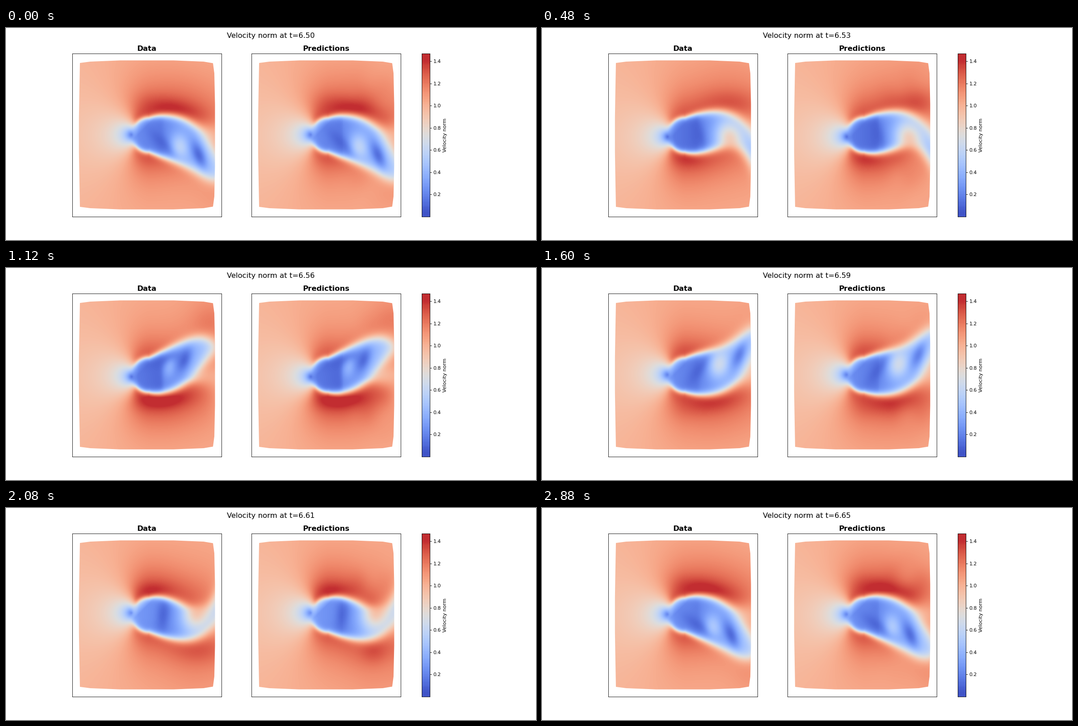
Recreate the animation shown at these times as a matplotlib script. Size 1183x473 px, loop 3040 ms.

```python
import numpy as np
import matplotlib.pyplot as plt
from matplotlib.animation import FuncAnimation
from matplotlib.colors import ListedColormap
from matplotlib.patches import Polygon

W, H, DPI = 1183, 473, 78.87
FRAMES, STEP = 19, 160
HALF = 9.3                 # half a shedding period, in frames
CX, CY, R = 318, 238.5, 38.5
VMAX = 1.467

xs = np.arange(162, 469.0)
X, Y = np.meshgrid(xs, np.arange(71, 408.0) - CY)
DOWN = np.clip((xs - CX) / 150, 0, None)    # 0 at the cylinder, 1 at the outlet


def sigmoid(v):
    return 0.5 + 0.5 * np.tanh(v / 2)


def bump(q, mid, width):
    return np.exp(-((q - mid) / width) ** 2)


def window(q, start, end):
    return sigmoid((q - start) / 0.3) * sigmoid((end - q) / 0.3)


def gauss(y, x0, y0, length, width, tilt):
    c, s = np.cos(np.radians(tilt)), np.sin(np.radians(tilt))
    p = c * (X - x0) + s * (y - y0)
    q = c * (y - y0) - s * (X - x0)
    return np.exp(-(p / length) ** 2 / 2 - (q / width) ** 2 / 2)


# Each feature maps its phase q to (x, y, length, width, tilt), speed, strength

def near(q):
    """Dead water right behind the cylinder."""
    low = sigmoid(0.2 - q)
    return (350, 36 * low, 28, 10, 85 - 73 * low), 0.07, 0.85 * window(q, -5, 4.6)


def eye(q):
    """Faster fluid drawn in beside the vortex."""
    grow = max(q, -3.5)
    shape = (388 + 10 * q, 26 * bump(q, -0.2, 3), 20 + 2 * grow, 14 + 2 * grow, 75)
    return shape, 0.33 + 0.64 * sigmoid((q - 0.4) / 1.2), 0.9 * window(q, -4.6, 6.5)


def core(q):
    rise = np.tanh(max(q + 3.8, 0) / 1.6)
    shape = (429 + 14.2 * q, 46 * rise, 9 + 15 * rise, 10, 70)
    return shape, 0.07 + 0.09 * max(q, 0), 0.9 * window(q, -4.5, 4.5)


def leaving(q):
    """Slow remains of a vortex at the outlet."""
    return (477, 38, 48, 16, 90), 0.8, 0.8 * bump(q, 5.4, 1.3)


def lobe(q):
    """Fast fluid over the wake, carried downstream."""
    shape = (318 + 150 * sigmoid((q - 0.8) / 2.4),
             -53 - 85 * sigmoid((q - 5.2) / 1.6),
             20 + 30 * bump(q, 1, 5.5),
             14 + 16 * sigmoid((q - 3) / 2),
             14 * bump(q, 0, 2.5))
    return shape, None, 0.24 * bump(q, -2.2, 5) + 0.17 * bump(q, 5.2, 3.4)


def copies(feature, k):
    """Visible copies of a feature; every other half period is mirrored."""
    for n in range(-2, 5):
        shape, speed, strength = feature(k - n * HALF)
        if strength > 0.004:
            yield (-1) ** n * Y, shape, speed, strength


def paint(v, feature, k):
    for y, shape, speed, strength in copies(feature, k):
        v = v + (speed - v) * strength * gauss(y, *shape)
    return v


def wake_top(k):
    """Upper wake edge: a skewed wave that grows downstream, and its slope."""
    psi = np.pi * (k + 3.2 - 2.7 * DOWN ** 3) / HALF
    wave = np.cos(psi + 0.45 * np.cos(psi))
    y = -R - 45 * DOWN + 61.5 * DOWN ** 2 + 80 * DOWN ** 1.5 * wave
    return y, np.hypot(1, np.gradient(y))


def free_stream(swing, k):
    dx, dy = (X - CX) / R, (Y - 5 * swing) / R
    front = np.minimum(dx, 0)
    r2 = np.maximum(np.where(dx < 0, dx, 0.35 * dx) ** 2 + dy ** 2, 0.5)
    u = 1 - 0.85 * (front ** 2 - dy ** 2) / r2 ** 2 + 0.12 * front / r2
    v = -1.7 * front * dy / r2 ** 2
    speed = np.hypot(u, v)
    speed = np.where(speed > 1, 1 + 0.28 * np.tanh((speed - 1) / 0.25), speed)
    for y, (x0, y0, a, b, tilt), _, amp in copies(lobe, k):
        speed = speed + amp * (0.5 * gauss(y, x0, y0, a, b, tilt)
                               + 0.5 * gauss(y, x0, y0, 1.6 * a, 3.6 * b, tilt))
    return speed


def slow_zone(swing, k):
    dx, dy = (X - CX) / R, Y / R
    ridge = np.clip(-(dx + dy) / 1.4 - 0.45, 0, 1)
    body = 0.18 - 0.07 * swing - 0.05 * dx + 0.35 * ridge * (1 - 0.5 * swing)
    wake = 0.2 + 0.24 * np.clip((X - 350) / 100, 0, 1)
    v = wake + (body - wake) * sigmoid((348 - X) / 2.5)
    for feature in (near, eye, core):
        v = paint(v, feature, k)
    return v


def field(k):
    """Speed everywhere, and how far each point lies outside the wake."""
    swing = np.sin(np.pi * (k - 0.35) / HALF)
    top, slope_top = wake_top(k)
    low, slope_low = wake_top(k + HALF)
    width = 3.2 + 5 * DOWN
    above = sigmoid((top - Y) / slope_top / width)
    below = sigmoid((Y + low) / slope_low / width)
    wake = 1 - (1 - above) * (1 - below)
    hull = sigmoid((np.hypot(X - CX, Y) - R) / width)
    out = np.where(X > CX, np.minimum(wake, hull), hull)
    slow = slow_zone(swing, k)
    v = slow + (free_stream(swing, k) - slow) * out
    return paint(v, leaving, k), out


rng = np.random.default_rng(4)
WAVES = np.column_stack([rng.uniform(.03, .09, 7), rng.uniform(-.09, .09, 7),
                         rng.uniform(0, 6.28, 7)])


def prediction(v, out, k):
    ripple = sum(np.sin(a * (X - 15 * k) + b * Y + c) for a, b, c in WAVES)
    mask = out * sigmoid((X - 375) / 14) * bump(Y, 0, 110)
    return v + 0.010 * ripple * mask + 0.012 * (1 - out) * (X > 350)


cmap = ListedColormap(plt.get_cmap("coolwarm")(np.clip(np.linspace(0, 1, 256), .02, .96)))
LOOK = dict(cmap=cmap, vmin=0, vmax=VMAX, aspect="auto")

plt.rcParams["font.family"] = "DejaVu Sans"
fig = plt.figure(figsize=((W + 1e-3) / DPI, (H + 1e-3) / DPI), dpi=DPI, facecolor="white")
heading = fig.suptitle("", fontsize=15, y=0.979)
TOP, FLOOR = 57.4, 421
BASE, TALL = 1 - FLOOR / H, (FLOOR - TOP) / H

# Upper half of the mesh outline, mirrored to close it
rim = [(162.8, 200), (164, 130), (165, 78), (188, 75), (255, 72.3), (374, 72.3),
       (441, 75), (462, 78.5), (465, 101), (466.5, 170)]
outline = rim + [(x, 2 * CY - y) for x, y in reversed(rim)]


def panel(left, title):
    ax = fig.add_axes([left / W, BASE, 333.3 / W, TALL])
    im = ax.imshow(np.ones_like(X), interpolation="bilinear",
                   extent=(xs[0], xs[-1] + 1, 408, 71), **LOOK)
    ax.set(xlim=(147.9, 481.2), ylim=(FLOOR, TOP), xticks=[], yticks=[])
    ax.set_title(title, fontsize=15, fontweight="bold")
    im.set_clip_path(Polygon(outline, closed=True, transform=ax.transData))
    return im


data = panel(147.9, "Data")
pred = panel(547.9, "Predictions")

bar = fig.add_axes([927.6 / W, BASE, 18.2 / W, TALL])
bar.imshow(np.linspace(0, VMAX, 100)[:, None], origin="lower",
           interpolation="nearest", extent=(0, 1, 0, VMAX), **LOOK)
bar.set_xticks([])
bar.yaxis.tick_right()
bar.yaxis.set_label_position("right")
bar.set_yticks(np.arange(1, 8) * 0.2)
bar.yaxis.set_major_formatter("{x:.1f}")
bar.set_ylabel("Velocity norm")


def update(k):
    v, out = field(k)
    data.set_data(v)
    pred.set_data(prediction(v, out, k))
    heading.set_text(f"Velocity norm at t={6.5 + 0.00855 * k:.2f}")
    return data, pred, heading


anim = FuncAnimation(fig, update, frames=FRAMES, interval=STEP,
                     init_func=lambda: update(0), repeat=True, repeat_delay=0)
plt.show()
```
